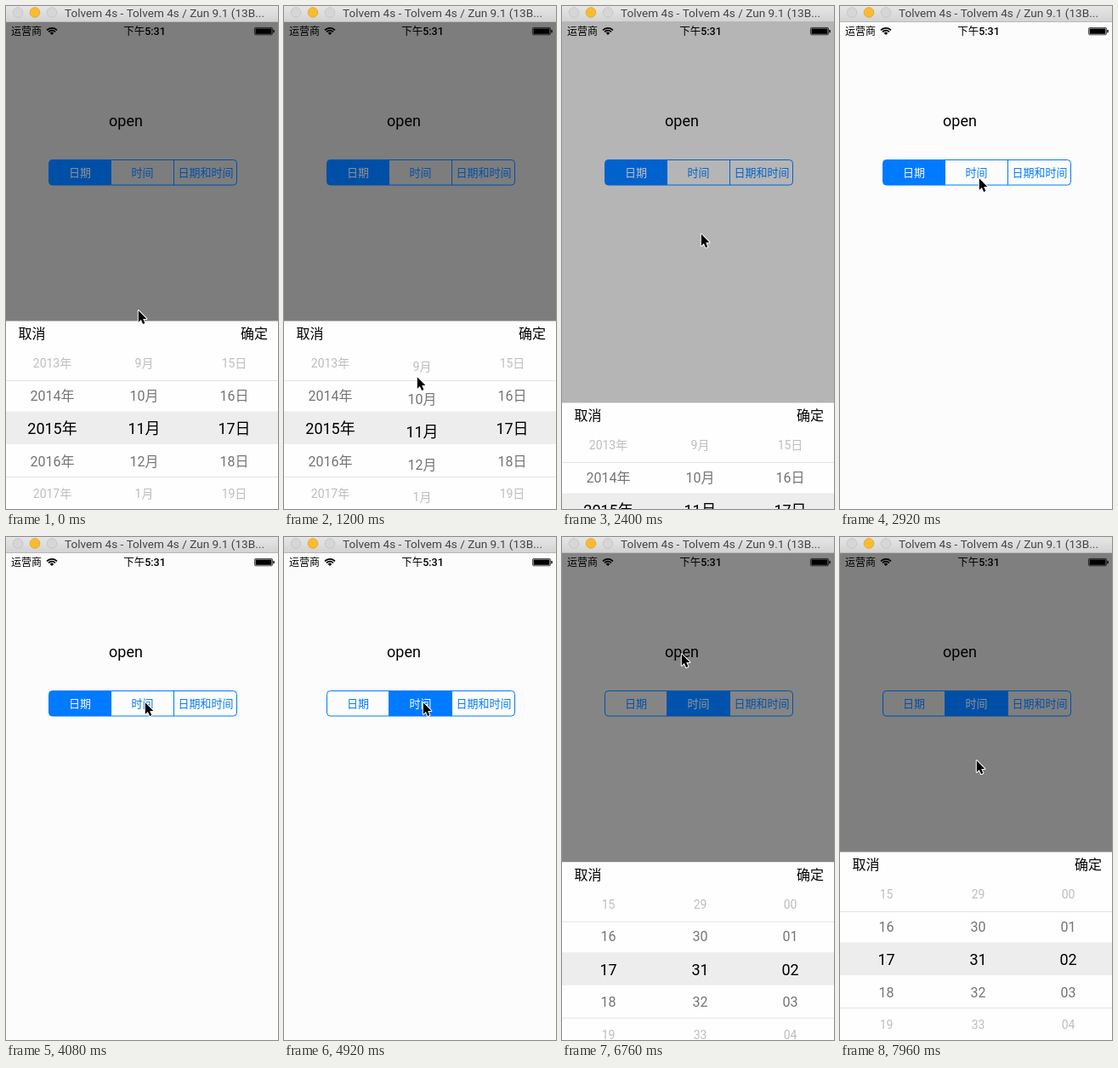
Recreate the animation shown at these times as an HTML page with a canvas. Size 320x590 px, loop 8000 ms.

```html
<!DOCTYPE html>
<html lang="zh">
<head>
<meta charset="utf-8">
<title>Picker</title>
<style>
  html, body { margin: 0; width: 100%; height: 100%; overflow: hidden; background: #fcfcfc; }
  canvas { display: block; }
</style>
</head>
<body>
<canvas id="stage" width="320" height="590"></canvas>
<script>
const ctx = document.getElementById('stage').getContext('2d');
const LOOP = 8000;
const FONT = 'Roboto, "Noto Sans CJK SC", "Noto Sans CJK", sans-serif';
const SHEET_TOP = 369.5, SHEET_HEIGHT = 221;
const COLUMNS = [54.5, 162.5, 268.5];
const ROWS = [
  { y: 419, size: 14, color: '#bdbdbd' },
  { y: 457, size: 16, color: '#747474' },
  { y: 495.5, size: 18, color: '#000' },
  { y: 534, size: 16, color: '#747474' },
  { y: 572, size: 14, color: '#bdbdbd' }
];
const DATE = [
  i => 2013 + i + '年',
  i => (8 + i) % 12 + 1 + '月',
  i => 15 + i + '日'
];
const TIME = [15, 29, 0].map(first => i => String(first + i).padStart(2, '0'));

// Each key: time, then values
const CURSOR = [
  [0, 155, 356], [40, 155, 356], [120, 155, 361], [280, 155, 361],
  [900, 156, 429], [1000, 156, 429], [1200, 156, 434], [1300, 156, 434],
  [1930, 163, 314], [2240, 163, 314], [2600, 163, 201], [3780, 163, 201],
  [4080, 163, 193], [5100, 163, 193], [5760, 140, 136], [7330, 140, 136],
  [7960, 160, 261]
];
const WHEEL = [[1000, 0], [1200, 4.3], [1300, 4.3], [1600, 0]];

const clamp = v => Math.max(0, Math.min(1, v));
const smooth = v => v * v * (3 - 2 * v);
const spring = v => v <= 0 ? 0 : 1 - (1 + v) * Math.exp(-v);

function track(keys, t) {
  const next = keys.findIndex(k => k[0] > t);
  if (next === 0) return keys[0].slice(1);
  if (next < 0) return keys[keys.length - 1].slice(1);
  const a = keys[next - 1], b = keys[next];
  const u = smooth((t - a[0]) / (b[0] - a[0]));
  return a.slice(1).map((v, i) => v + (b[i + 1] - v) * u);
}

function text(str, x, y, size, color, align = 'center', weight = 400) {
  ctx.font = `${weight} ${size}px ${FONT}`;
  ctx.fillStyle = color;
  ctx.textAlign = align;
  ctx.textBaseline = 'alphabetic';
  ctx.fillText(str, x, y + size * 0.36);
}

function rect(x, y, w, h, color) {
  ctx.fillStyle = color;
  ctx.fillRect(x, y, w, h);
}

function titleBar() {
  const shade = ctx.createLinearGradient(0, 0, 0, 18);
  shade.addColorStop(0, '#e6e6e6');
  shade.addColorStop(1, '#d3d3d3');
  rect(0, 0, 320, 18, shade);
  rect(0, 18, 320, 1, '#b8b8b8');
  [[14, '#d6d6d6', '#c0c0c0'], [34, '#fabb2e', '#e0a023'], [54, '#d6d6d6', '#c0c0c0']].forEach(([x, fill, edge]) => {
    ctx.beginPath();
    ctx.arc(x, 7.5, 5.8, 0, 7);
    ctx.fillStyle = fill;
    ctx.fill();
    ctx.strokeStyle = edge;
    ctx.lineWidth = 0.8;
    ctx.stroke();
  });
  text('Tolvem 4s - Tolvem 4s / Zun 9.1 (13B...', 69, 8.5, 13.6, '#444', 'left');
}

function statusBar() {
  text('运营商', 6, 29.5, 12, '#000', 'left');
  text('下午5:31', 163, 29.5, 12.5, '#000', 'center', 500);

  ctx.strokeStyle = ctx.fillStyle = '#000';
  ctx.lineWidth = 1.7;
  [8.2, 5.4].forEach(r => {
    ctx.beginPath();
    ctx.arc(54, 34, r, -Math.PI * 0.76, -Math.PI * 0.24);
    ctx.stroke();
  });
  ctx.beginPath();
  ctx.moveTo(54, 34);
  ctx.arc(54, 34, 3.2, -Math.PI * 0.76, -Math.PI * 0.24);
  ctx.fill();

  ctx.lineWidth = 0.7;
  ctx.beginPath();
  ctx.roundRect(292.4, 25.4, 21.2, 8.4, 1.6);
  ctx.stroke();
  rect(293.5, 26.4, 19, 6.4, '#000');
  rect(314.3, 28, 1.4, 3.2, '#000');
}

function segments(t, dim) {
  const blue = `rgb(0,${122 * (1 - 0.35 * dim)},${255 * (1 - 0.35 * dim)})`;
  const light = 252 * (1 - 0.42 * dim);
  const moved = clamp((t - 4490) / 300);
  const pressed = t >= 4320 ? 0.18 : 0;
  const fills = [1 - moved, Math.max(moved, pressed), 0];
  const edges = [50.5, 123.5, 197.5, 271.5];

  ctx.save();
  ctx.beginPath();
  ctx.roundRect(50.5, 180.5, 221, 29.5, 4);
  ctx.clip();
  fills.forEach((alpha, i) => {
    ctx.globalAlpha = alpha;
    rect(edges[i], 180, edges[i + 1] - edges[i], 31, blue);
  });
  ctx.restore();

  ctx.strokeStyle = blue;
  ctx.lineWidth = 1;
  ctx.beginPath();
  ctx.roundRect(50.5, 180.5, 221, 29.5, 4);
  [123.5, 197.5].forEach(x => {
    ctx.moveTo(x, 180.5);
    ctx.lineTo(x, 210);
  });
  ctx.stroke();

  const selected = [1 - moved, moved, 0];
  ['日期', '时间', '日期和时间'].forEach((label, i) => {
    const x = [87, 160.5, 235][i];
    text(label, x, 195.3, 13, blue);
    ctx.globalAlpha = selected[i];
    text(label, x, 195.3, 13, `rgb(${light},${light},${light})`);
    ctx.globalAlpha = 1;
  });
}

function sheet(t, open) {
  ctx.save();
  ctx.translate(0, (1 - open) * SHEET_HEIGHT);
  rect(0, SHEET_TOP, 320, SHEET_HEIGHT, '#fefefe');
  rect(0, 439, 320, 1, '#e4e4e4');
  rect(0, 552, 320, 1, '#e4e4e4');
  rect(0, 475.5, 320, 38.5, '#ededed');
  text('取消', 30.5, 384.5, 16, '#000');
  text('确定', 292, 384.5, 16, '#000');

  const [shift] = track(WHEEL, t);
  const labels = t < 4000 ? DATE : TIME;
  COLUMNS.forEach((x, c) => ROWS.forEach((row, i) =>
    text(labels[c](i), x, row.y + (c === 1 ? shift : 0), row.size, row.color)));
  ctx.restore();
}

function cursor(t) {
  const [x, y] = track(CURSOR, t);
  ctx.save();
  ctx.translate(x + 0.8, y + 1.2);
  ctx.beginPath();
  [[0, 0], [0, 13.6], [3.1, 10.8], [5.3, 15.8], [7.6, 14.8], [5.4, 9.9], [9.6, 9.7]]
    .forEach(p => ctx.lineTo(...p));
  ctx.closePath();
  ctx.lineJoin = 'round';
  ctx.lineWidth = 2;
  ctx.strokeStyle = '#fff';
  ctx.stroke();
  ctx.fillStyle = '#000';
  ctx.fill();
  ctx.restore();
}

function draw(t) {
  const open = t < 4000
    ? 1 - spring((t - 2280) * 0.0122)
    : spring((t - 6500) * 0.0179);
  rect(0, 0, 320, 590, '#fcfcfc');
  rect(0, 19, 320, 571, `rgba(0,0,0,${0.5 * open})`);
  titleBar();
  statusBar();
  text('open', 141, 135, 18, '#000');
  segments(t, open);
  if (open > 0.004) sheet(t, open);
  cursor(t);
}

function frame(now) {
  draw(now % LOOP);
  requestAnimationFrame(frame);
}
requestAnimationFrame(frame);
</script>
</body>
</html>
```
